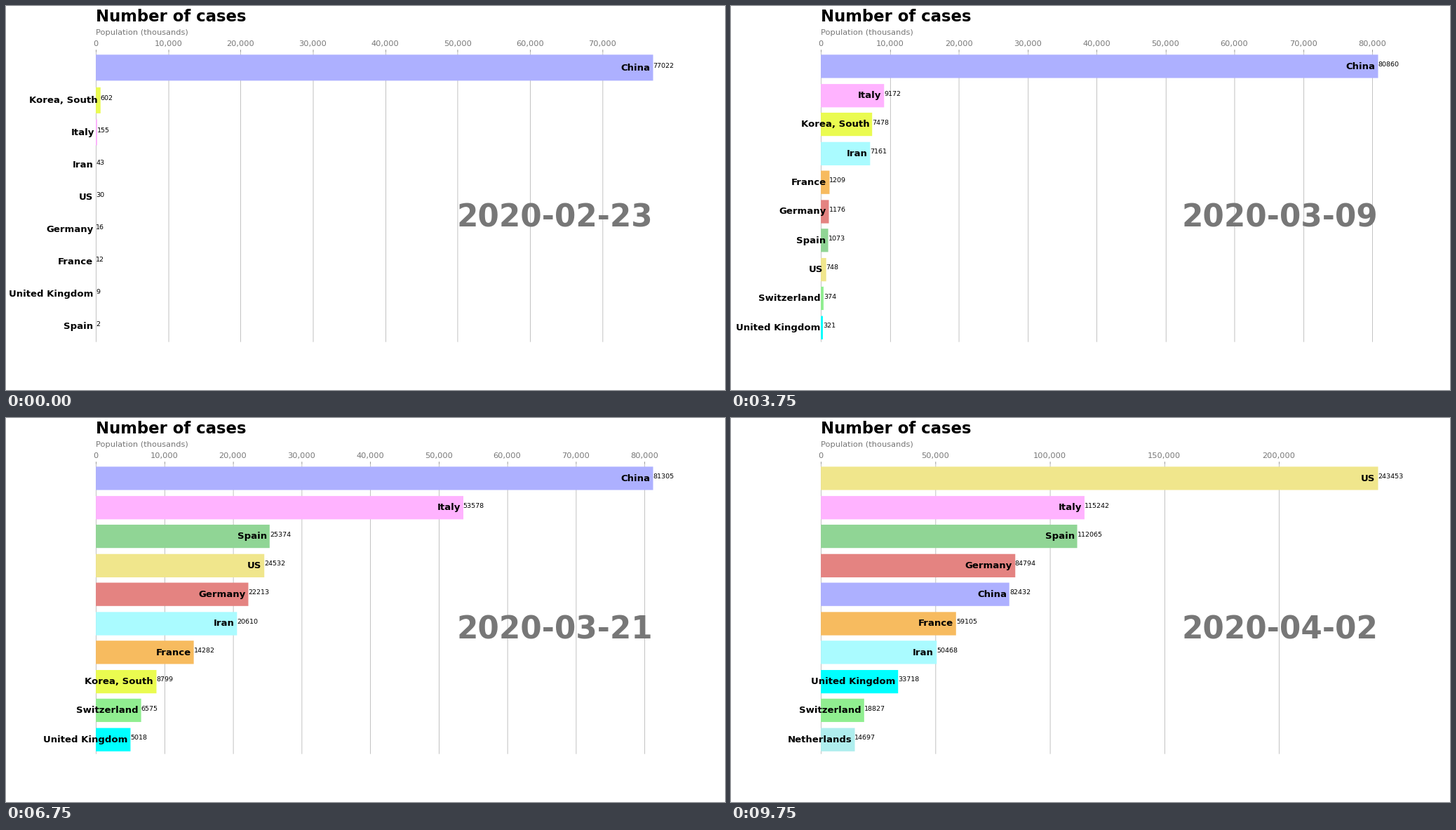
Recreate the animation shown at these times as a matplotlib script. Size 1025 by 547 pixels, loop 10 s.

```python
import matplotlib.pyplot as plt
import numpy as np
from matplotlib.animation import FuncAnimation
from matplotlib.patches import Rectangle
from matplotlib.ticker import MaxNLocator

WIDTH, HEIGHT, DPI = 1025, 547, 64
# The layout is planned on a grid of 1080 x 576 units and scaled to the stage.
GRID_W, GRID_H = 1080, 576
SCALE = WIDTH / GRID_W * 72 / DPI  # points per grid unit
LEFT, RIGHT = 0.125 * GRID_W, 0.9 * GRID_W
BOTTOM, TOP = 0.125 * GRID_H, 0.88 * GRID_H
PLOT_W, PLOT_H = RIGHT - LEFT, TOP - BOTTOM

START = np.datetime64("2020-02-23")
DAYS, MAX_ROWS = 40, 10
BAR, MARGIN = 0.8, 0.01
GREY = "#777777"

# Colour and a few known counts; growth between them follows a smooth curve.
KEY_DAYS = np.array([0, 6, 15, 23, 27, 33, 39])
COUNTRIES = {
    "China": ("#adb0ff", [77022, 79356, 80860, 81058, 81305, 81897, 82432]),
    "Italy": ("#ffb3ff", [155, 1128, 9172, 31506, 53578, 86498, 115242]),
    "Korea, South": ("#eafb50", [602, 3150, 7478, 8320, 8799, 9332, 9976]),
    "Iran": ("#aafbff", [43, 593, 7161, 16169, 20610, 32332, 50468]),
    "US": ("#f0e68c", [30, 70, 748, 5905, 24532, 101657, 243453]),
    "Spain": ("#90d595", [2, 45, 1073, 11748, 25374, 65719, 112065]),
    "Germany": ("#e48381", [16, 79, 1176, 9257, 22213, 50871, 84794]),
    "France": ("#f7bb5f", [12, 100, 1209, 7652, 14282, 32964, 59105]),
    "United Kingdom": ("#00ffff", [9, 23, 321, 1950, 5018, 14543, 33718]),
    "Switzerland": ("#90ee90", [0, 18, 374, 2700, 6575, 12928, 18827]),
    "Netherlands": ("#afeeee", [0, 6, 321, 1705, 3631, 8603, 14697]),
}


def cases_on(counts, day):
    """Cubic Hermite interpolation of the logarithm of the counts."""
    logs = np.log1p(counts)
    slopes = np.gradient(logs, KEY_DAYS)
    k = min(np.searchsorted(KEY_DAYS, day, side="right"), len(KEY_DAYS) - 1) - 1
    step = KEY_DAYS[k + 1] - KEY_DAYS[k]
    t = (day - KEY_DAYS[k]) / step
    ease = t * t * (3 - 2 * t)
    log = (logs[k] * (1 - ease) + logs[k + 1] * ease
           + step * t * (1 - t) * (slopes[k] * (1 - t) - slopes[k + 1] * t))
    return max(0, int(round(float(np.expm1(log)))))


def ranking(day):
    rows = [(cases_on(counts, day), name, color)
            for name, (color, counts) in COUNTRIES.items()]
    rows.sort(key=lambda row: row[0], reverse=True)
    return [row for row in rows if row[0] > 0][:MAX_ROWS]


plt.rcParams["font.family"] = "DejaVu Sans"
fig = plt.figure(figsize=(WIDTH / DPI, HEIGHT / DPI), dpi=DPI, facecolor="white")
ax = fig.add_axes([0, 0, 1, 1])


def label(x, y, text, size, **style):
    ax.text(x, y, text, size=size * SCALE, **style)


def vertical(x, y0, y1, color, zorder):
    ax.plot([x, x], [y0, y1], color=color, linewidth=0.8 * SCALE, zorder=zorder,
            solid_capstyle="butt", snap=False)


def draw_scale(maximum):
    locator = MaxNLocator(nbins=9, steps=[1, 2, 2.5, 5, 10])
    for tick in locator.tick_values(0, maximum):
        if tick > maximum:
            continue
        x = LEFT + PLOT_W * tick / maximum
        line_x = round(x) + 0.5
        vertical(line_x, BOTTOM, TOP, "#b0b0b0", 0.5)
        vertical(line_x, TOP, TOP + 3.5, GREY, 2)
        label(x, TOP + 7, f"{tick:,.0f}", 12, color=GREY, ha="center", va="bottom")


def draw_bars(rows):
    span = len(rows) - 1 + BAR
    pitch = PLOT_H / (span * (1 + 2 * MARGIN))
    for rank, (value, name, color) in enumerate(rows):
        x = LEFT + PLOT_W * value / rows[0][0]
        y = TOP - pitch * (rank + BAR / 2 + MARGIN * span)
        low, high = round(y - pitch * BAR / 2), round(y + pitch * BAR / 2)
        ax.add_patch(Rectangle((LEFT, low), round(x) - LEFT, high - low,
                               facecolor=color, linewidth=0, snap=False))
        label(x - PLOT_W / 200, y, name, 14, weight="bold", ha="right", va="center")
        label(x, y, str(value), 10)


def draw(day):
    ax.clear()
    ax.set(xlim=(0, GRID_W), ylim=(0, GRID_H))
    ax.set_autoscale_on(False)
    ax.axis("off")
    rows = ranking(day)
    draw_scale(rows[0][0])
    draw_bars(rows)
    label(RIGHT, BOTTOM + 0.398 * PLOT_H, str(START + day), 46,
          color=GREY, weight="bold", ha="right")
    label(LEFT, TOP + 0.06 * PLOT_H, "Population (thousands)", 12, color=GREY)
    label(LEFT, TOP + 0.15 * PLOT_H, "Number of cases", 24, weight="bold", va="top")


animation = FuncAnimation(fig, draw, frames=DAYS, interval=250, repeat=True, repeat_delay=0)
plt.show()
```
